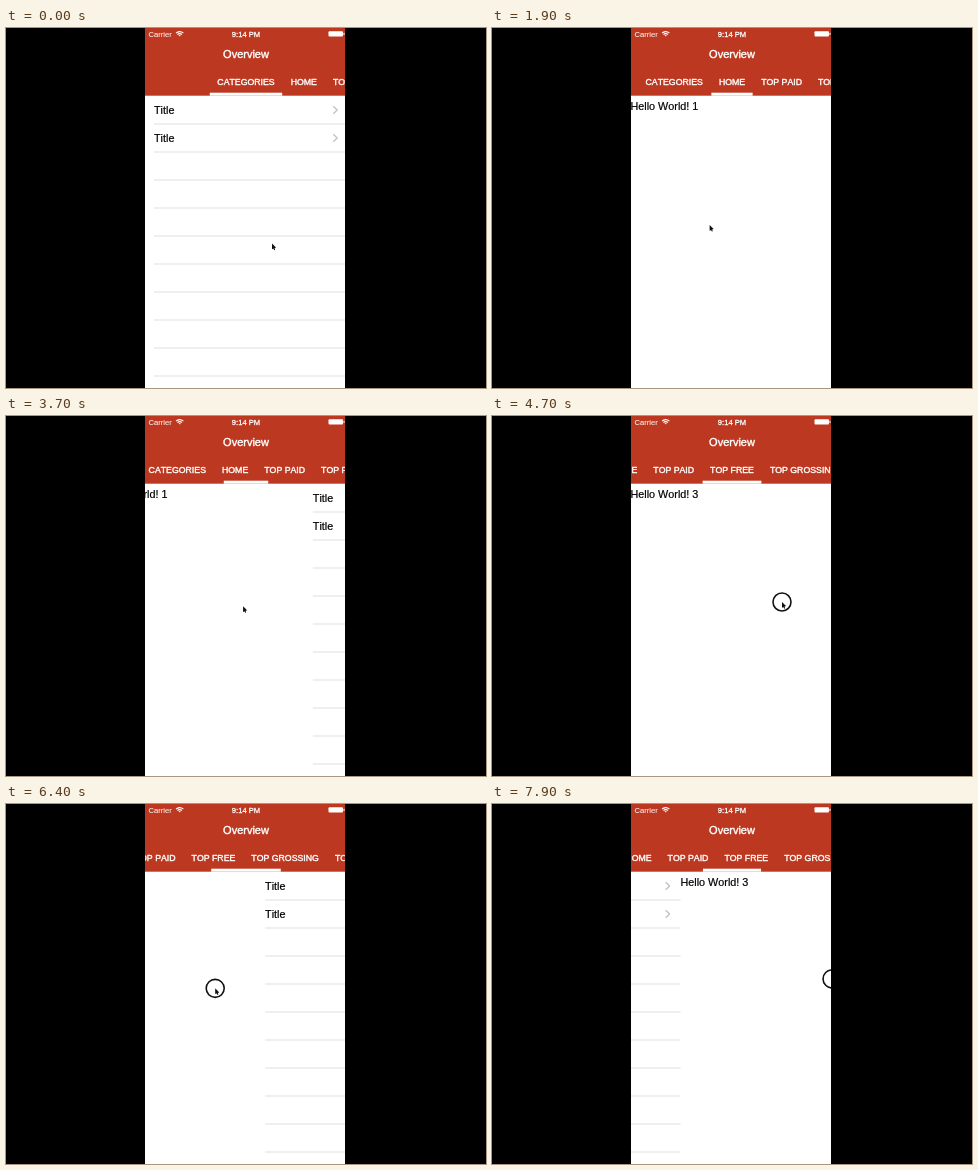
Write an HTML page with a canvas that moves like this. It is 480x360 px and loops after 8 s.

```html
<!DOCTYPE html>
<html lang="en">
<head>
<meta charset="utf-8">
<title>Overview tabs</title>
<style>
html, body { margin: 0; width: 100%; height: 100%; overflow: hidden; background: #000; }
canvas { display: block; width: 480px; height: 360px; }
</style>
</head>
<body>
<canvas id="stage"></canvas>
<script>
const canvas = document.getElementById('stage');
const ctx = canvas.getContext('2d');
const dpr = window.devicePixelRatio || 1;
canvas.width = 480 * dpr;
canvas.height = 360 * dpr;

const LOOP = 8000, STEP = 100;
const LEFT = 138.5, PAGE_W = 203.6, MID = 240, HEADER_H = 67.7;
const FONT = '"Liberation Sans", Arial, sans-serif';
const TAB_SIZE = 8.75, TAB_GAP = 16, BODY_SIZE = 10.8;
const TAB_NAMES = ['CATEGORIES', 'HOME', 'TOP PAID', 'TOP FREE', 'TOP GROSSING', 'TOP NEW FREE'];

const lerp = (a, b, u) => a + (b - a) * u;
const clamp = u => Math.max(0, Math.min(1, u));

// Where the pointer rests or turns
const stops = [
  { t: 0, x: 266, y: 215.5 },
  { t: 1200, x: 208, y: 198.5 },
  { t: 2800, x: 230, y: 195 },
  { t: 4500, x: 290, y: 186 },
  { t: 4700, x: 290, y: 186 },
  { t: 5600, x: 242, y: 187 },
  { t: 7100, x: 180.5, y: 182 },
  { t: LOOP, x: 360, y: 174 }
];

// Short flicks between neighbouring pages, then one long held drag
const flick = (press, from, to, hold = 200) => ({ press, release: press + hold, from, to });
const flicks = [flick(300, 0, 1), flick(2300, 1, 0, 300)];
for (let page = 0; page < 3; page++) flicks.push(flick(3000 + page * 500, page, page + 1));
const HOLD = 4600, DRAG = 4700;

function pointer(t) {
  const i = stops.findIndex(s => s.t > t);
  const a = stops[i - 1], b = stops[i];
  const u = (t - a.t) / (b.t - a.t);
  let x = lerp(a.x, b.x, u), down = t >= HOLD;
  for (const f of flicks) {
    const lead = 150;
    const v = clamp((t - f.press + lead) / (f.release - f.press + 2 * lead));
    x += 26 * (f.to - f.from) * Math.sin(v * Math.PI * 2);
    down ||= t >= f.press && t < f.release;
  }
  return { x, y: lerp(a.y, b.y, u), down };
}

function pagePos(t) {
  if (t > DRAG) {
    const slop = 0.025 * (1 - clamp((t - DRAG) / 300));
    return 3.608 - (pointer(t).x - 180.5) * 0.00535 - slop;
  }
  let p = 0;
  for (const f of flicks) {
    if (t < f.press) break;
    const pulled = 0.22 * clamp((t - f.press) / (f.release - f.press)) ** 2;
    const rest = (1 - clamp((t - f.release) / 420)) ** 3;
    p = lerp(f.from, f.to, 1 - (1 - pulled) * rest);
  }
  return p;
}

function text(str, x, y, size, color, weight, align = 'left') {
  ctx.font = `${size}px ${FONT}`;
  ctx.textAlign = align;
  ctx.fillStyle = ctx.strokeStyle = color;
  ctx.lineWidth = weight;
  ctx.fillText(str, x, y);
  ctx.strokeText(str, x, y);
}

function line(points, color, width) {
  ctx.beginPath();
  points.forEach(([x, y]) => ctx.lineTo(x, y));
  ctx.strokeStyle = color;
  ctx.lineWidth = width;
  ctx.stroke();
}

function layoutTabs() {
  ctx.font = `${TAB_SIZE}px ${FONT}`;
  ctx.fontKerning = 'none';
  let x = 0;
  return TAB_NAMES.map(name => {
    const w = ctx.measureText(name).width;
    const tab = { name, w, mid: x + w / 2 };
    x += w + TAB_GAP;
    return tab;
  });
}
const tabs = layoutTabs();

function drawTable(x) {
  const row = 28, inset = 9.5;
  ctx.fillStyle = '#e0e0e3';
  for (let y = 95.5; y < 350; y += row) ctx.fillRect(x + inset, y, PAGE_W - inset, 1);
  for (const y of [82, 82 + row]) {
    text('Title', x + inset, y + 3.8, BODY_SIZE, '#000', 0.2);
    line([[x + 188.8, y - 3.8], [x + 192.7, y], [x + 188.8, y + 3.8]], '#c0c0c5', 1.3);
  }
}

function drawPages(p) {
  for (let i = Math.floor(p); i <= Math.ceil(p); i++) {
    const x = LEFT + (i - p) * PAGE_W;
    if (i % 2) text('Hello World! ' + i, x, 81.5, BODY_SIZE, '#000', 0.2);
    else drawTable(x);
  }
}

function drawStatus() {
  text('Carrier', 142.5, 8.6, 7.6, '#fbeeea', 0.1);
  text('9:14 PM', MID, 8.6, 7.6, '#fff', 0.3, 'center');
  for (let r = 1; r < 6; r += 2) {
    ctx.beginPath();
    ctx.arc(173.7, 8.6, r, -Math.PI * 0.76, -Math.PI * 0.24);
    ctx.strokeStyle = '#fff';
    ctx.lineWidth = 1.1;
    ctx.stroke();
  }
  ctx.fillStyle = '#fff';
  ctx.beginPath();
  ctx.roundRect(322.5, 3.2, 14.5, 5.4, 1);
  ctx.fill();
  ctx.fillRect(337.5, 4.8, 1, 2.2);
}

function drawHeader(p) {
  ctx.fillStyle = '#bd3820';
  ctx.fillRect(139, 0, 200, HEADER_H);
  drawStatus();
  text('Overview', MID, 29.8, 11, '#fff', 0.4, 'center');

  const i = Math.floor(p), u = p - i;
  const shift = MID - lerp(tabs[i].mid, tabs[i + 1].mid, u);
  const bar = lerp(tabs[i].w, tabs[i + 1].w, u) + TAB_GAP - 1;
  for (const tab of tabs) text(tab.name, tab.mid + shift, 57.3, TAB_SIZE, '#fff', 0.4, 'center');
  ctx.fillStyle = '#fff';
  ctx.fillRect(MID - bar / 2, HEADER_H - 3, bar, 3);
}

function drawPointer({ x, y, down }) {
  if (down) {
    ctx.beginPath();
    ctx.arc(x, y, 9, 0, Math.PI * 2);
    ctx.strokeStyle = '#111';
    ctx.lineWidth = 1.6;
    ctx.stroke();
  }
  ctx.fillStyle = '#111';
  ctx.beginPath();
  ctx.moveTo(x, y);
  ctx.lineTo(x, y + 5.7);
  ctx.lineTo(x + 4, y + 4.1);
  ctx.fill();
  line([[x + 1.6, y + 4], [x + 2.7, y + 6.4]], '#111', 1.1);
}

function draw(t) {
  ctx.setTransform(dpr, 0, 0, dpr, 0, 0);
  ctx.lineJoin = 'round';
  ctx.fontKerning = 'none';
  ctx.fillStyle = '#000';
  ctx.fillRect(0, 0, 480, 360);
  ctx.save();
  ctx.beginPath();
  ctx.rect(139, 0, 200, 360);
  ctx.clip();
  ctx.fillStyle = '#fff';
  ctx.fillRect(139, 0, 200, 360);
  const p = pagePos(t);
  drawPages(p);
  drawHeader(p);
  drawPointer(pointer(t));
  ctx.restore();
}

let start = null;
function frame(now) {
  if (start === null) start = now;
  draw(Math.floor(((now - start) % LOOP) / STEP) * STEP);
  requestAnimationFrame(frame);
}
draw(0);
requestAnimationFrame(frame);
</script>
</body>
</html>
```
